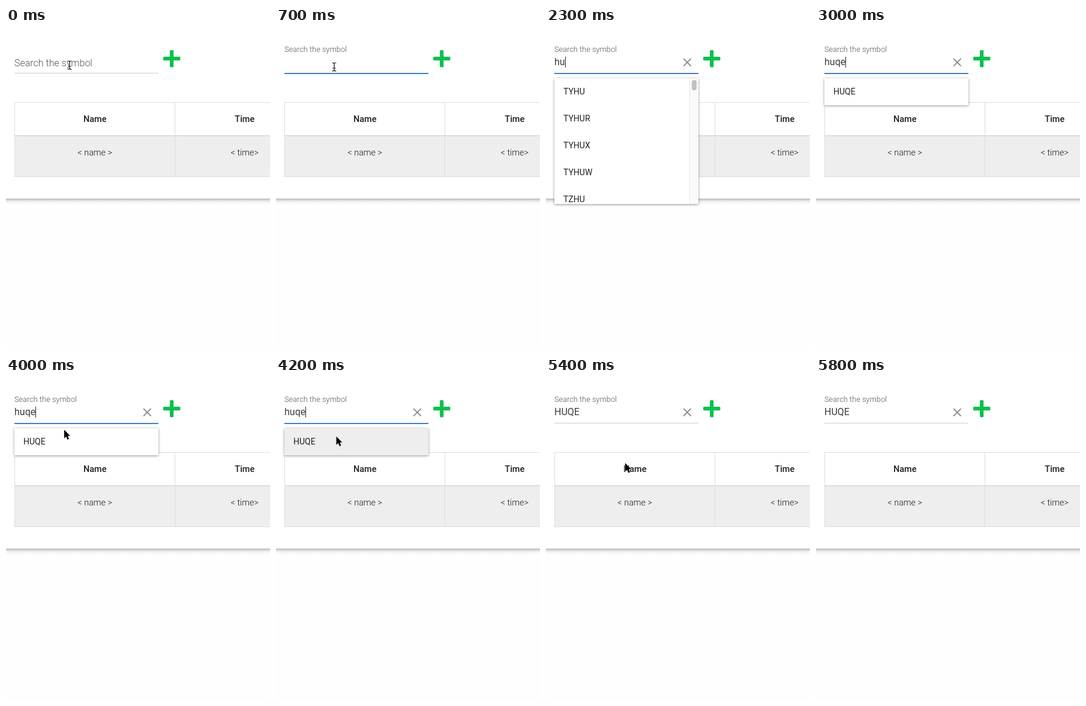
These frames come from a looping animation (440 px wide and 538 px high, 6600 ms). An HTML page:

```html
<!DOCTYPE html>
<html lang="en">
<head>
<meta charset="utf-8">
<title>Symbol search</title>
<style>
  html, body { margin: 0; width: 100%; height: 100%; overflow: hidden; background: #fff; }
  svg { display: block; width: 440px; height: 538px; font-family: Roboto, sans-serif; }
  .line { fill: #ddd; }
  .head { font-size: 14.5px; font-weight: 500; fill: #1f1f1f; text-anchor: middle; }
  .cell { font-size: 14.4px; font-weight: 300; fill: #1c1c1c; text-anchor: middle; }
  .item { font-size: 14px; fill: #212121; }
  #label { font-weight: 300; fill: #555; }
  #value { font-size: 16px; fill: #3c3c3c; }
  #panel { filter: drop-shadow(0 1px 2px rgba(0, 0, 0, .42)); }
</style>
</head>
<body>
<svg viewBox="0 0 440 538">
  <defs>
    <linearGradient id="fade" x1="0" y1="0" x2="0" y2="1">
      <stop offset="0" stop-color="#b4b4b4"/>
      <stop offset=".2" stop-color="#d2d2d2"/>
      <stop offset=".55" stop-color="#f2f2f2"/>
      <stop offset="1" stop-color="#fefefe"/>
    </linearGradient>
    <clipPath id="clip"><rect id="clipBox" x="14" y="84" width="240"/></clipPath>
  </defs>

  <rect width="440" height="538" fill="#fefefe"/>
  <rect width="440" height="285" fill="#fff"/>
  <rect y="285" width="440" height="10" fill="url(#fade)"/>

  <rect x="14" y="180" width="426" height="68" fill="#eee"/>
  <g class="line">
    <rect x="14" y="124" width="426" height="1"/>
    <rect x="14" y="179" width="426" height="2"/>
    <rect x="14" y="248" width="426" height="1"/>
    <rect x="14" y="124" width="1" height="125"/>
    <rect x="281" y="124" width="1" height="125"/>
  </g>
  <text class="head" x="148.2" y="157">Name</text>
  <text class="head" x="397.8" y="157">Time</text>
  <text class="cell" x="148.2" y="213">&lt; name &gt;</text>
  <text class="cell" x="397.8" y="213">&lt; time&gt;</text>

  <g fill="#0bc04d">
    <rect x="262" y="48" width="28.5" height="6.2" rx="1.6"/>
    <rect x="273.1" y="37" width="6.2" height="28.5" rx="1.6"/>
  </g>

  <rect x="14" y="75" width="240" height="1" fill="#ccc"/>
  <rect id="focus" x="14" y="75" width="240" height="2" fill="#3f80c6"/>
  <text id="label">Search the symbol</text>
  <text id="value" x="14" y="62"></text>
  <rect id="caret" y="48" width="1" height="18" fill="#222"/>
  <path id="clear" d="M229.2 51.2l12.4 12.4M241.6 51.2l-12.4 12.4" stroke="#8a8a8a" stroke-width="1.9"/>

  <g id="panel">
    <rect id="sheet" x="14" y="84" width="240" fill="#fff"/>
    <g id="items" clip-path="url(#clip)"></g>
    <g id="bar">
      <rect x="239" y="84" width="15" height="210" fill="#fafafa"/>
      <rect x="239" y="84" width="1" height="210" fill="#e6e6e6"/>
      <rect x="243" y="87" width="8" height="17" rx="4" fill="#c1c1c1"/>
    </g>
  </g>

  <g id="beam" fill="none" stroke-linecap="round">
    <path d="M-3-7Q0-7 0-5Q0-7 3-7M0-5V5M-3 7Q0 7 0 5Q0 7 3 7M-2 2H2" stroke="#fff" stroke-width="2.6" stroke-opacity=".8"/>
    <path d="M-3-7Q0-7 0-5Q0-7 3-7M0-5V5M-3 7Q0 7 0 5Q0 7 3 7M-2 2H2" stroke="#111" stroke-width="1.2"/>
  </g>
  <path id="arrow" d="M0 0V14.2L3.2 11.2L5.4 16.4L8 15.3L5.8 10.2H10Z" fill="#000" stroke="#fff" stroke-width="1" paint-order="stroke"/>
</svg>
<script>
const LOOP = 6600, TICK = 100;
const $ = id => document.getElementById(id);
const matches = ['TYHU', 'TYHUR', 'TYHUX', 'TYHUW', 'TZHU'];
const pick = 'HUQE';

// [start time, value]
const typed = [[0, ''], [2100, 'h'], [2200, 'hu'], [2800, 'huq'], [2900, 'huqe'], [4400, pick]];
const menu = [[0, 'none'], [2300, 'all'], [3000, 'one'], [4400, 'none']];
const caretOn = [[0, 0], [200, 1], [700, 0], [1200, 1], [1700, 0], [2100, 1], [3400, 0], [3900, 1], [4400, 0]];
const floated = [[0, 0], [200, .35], [300, .85], [400, 1]];
const pointer = [
  [0, ['beam', 106, 62]], [200, ['beam', 101, 64]], [300, ['beam', 97, 65]], [2100, null],
  [3900, ['beam', 97, 68]], [4000, ['arrow', 97, 86.5]], [4100, ['arrow', 99, 93]], [4200, ['arrow', 100.5, 97.5]],
  [4900, ['arrow', 97, 83]], [5000, ['arrow', 94, 69]]
];
const EXIT = 5400, GONE = 5800;

const at = (track, t) => track.reduce((v, [start, next]) => t >= start ? next : v, track[0][1]);
const show = (id, on) => $(id).setAttribute('visibility', on ? 'visible' : 'hidden');
const set = (id, attrs) => { for (const k in attrs) $(id).setAttribute(k, attrs[k]); };

function pointerAt(t) {
  if (t >= GONE) return null;
  if (t < EXIT) return at(pointer, t);
  const p = (t - EXIT + TICK) / (GONE - EXIT);
  return ['arrow', 94 + 152 * p, 69 + 443 * Math.pow(p, 1.3)];
}

function drawMenu(state, hover) {
  const open = state !== 'none';
  const rows = state === 'all' ? matches : [pick];
  const height = state === 'all' ? 210 : 45;
  $('panel').style.display = open ? '' : 'none';
  if (!open) return;
  set('sheet', { height, fill: hover ? '#eee' : '#fff' });
  set('clipBox', { height });
  $('bar').style.display = state === 'all' ? '' : 'none';
  $('items').innerHTML = rows.map((s, i) => `<text class="item" x="29" y="${111 + 45 * i}">${s}</text>`).join('');
}

let last = -1;
function render(ms) {
  const t = Math.floor(ms % LOOP / TICK) * TICK;
  if (t === last) return;
  last = t;

  const up = at(floated, t);
  set('label', { transform: `translate(14 ${64 - 24.5 * up}) scale(${1 - .2 * up})`, 'font-size': 16 });
  show('focus', t >= 200 && t < 4500);

  const text = at(typed, t);
  $('value').textContent = text;
  const end = text ? $('value').getComputedTextLength() : 0;
  set('caret', { x: Math.round(14 + end) });
  show('caret', at(caretOn, t));
  show('clear', text);
  drawMenu(at(menu, t), t >= 4100);

  const p = pointerAt(t);
  for (const id of ['beam', 'arrow']) {
    const on = p && p[0] === id;
    show(id, on);
    if (on) set(id, { transform: `translate(${p[1]} ${p[2]})` });
  }
}

const begin = performance.now();
function frame() {
  render(performance.now() - begin);
  requestAnimationFrame(frame);
}
frame();
</script>
</body>
</html>
```
